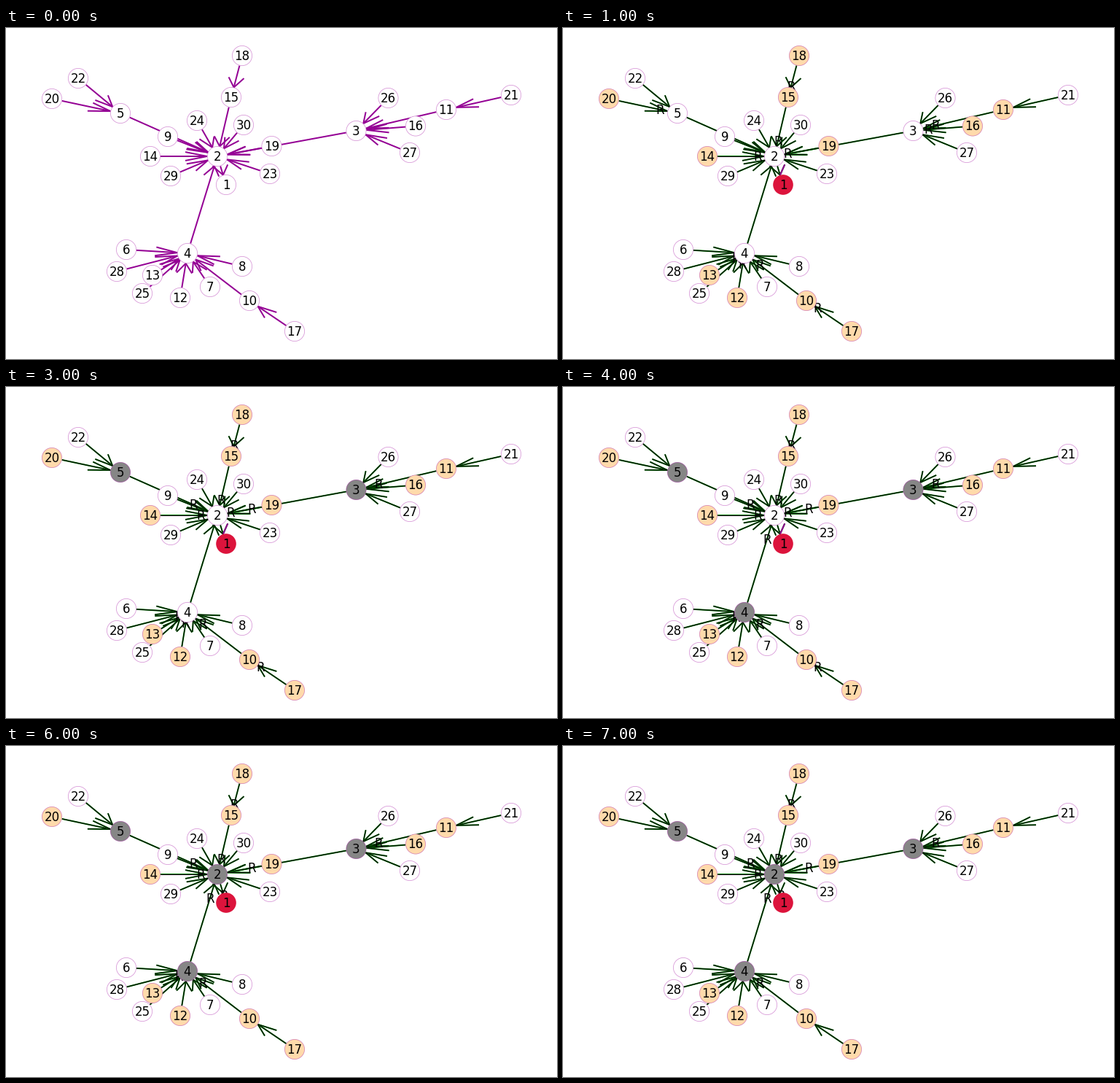
Animation, 756 px wide and 454 px high, one loop 8 s. Source, as a matplotlib script:

```python
import math
import matplotlib.pyplot as plt
from matplotlib.animation import FuncAnimation
from matplotlib.patches import Circle

W, H, DPI = 756, 454, 100
PX = 72 / DPI
RADIUS = 14
STRETCH = 1.79      # arrowheads are wider than tall by this ratio
PURPLE, GREEN, BLACK = "#940094", "#008000", "#000000"
WHITE, PEACH, GRAY, RED = "#ffffff", "#ffdaab", "#868686", "#dc143c"

POS = dict(enumerate([
    (302, 215), (290, 176), (480.5, 141), (249, 309), (157, 117),
    (165, 304), (280, 355), (324, 327), (222, 149), (334, 374),
    (604, 112), (239, 370), (201, 339), (198, 176), (309, 95),
    (562, 134.5), (396, 416), (324, 38), (364.5, 162), (63, 97),
    (693, 92), (99, 69), (362, 200), (262, 127), (187, 364),
    (524.5, 96), (554, 171), (152, 334), (226, 203), (326, 133)], 1))

CHILDREN = {1: [2], 2: [3, 4, 5, 9, 14, 15, 19, 23, 24, 29, 30],
            3: [11, 16, 26, 27], 4: [6, 7, 8, 10, 12, 13, 25, 28],
            5: [20, 22], 10: [17], 11: [21], 15: [18]}
PARENT = {c: p for p, kids in CHILDREN.items() for c in kids}

SENDERS = range(10, 21)
# one request per step: the sender is served, its parent forwards
SERVED = [16, 20, 12, 17, 19, 13]

fig = plt.figure(figsize=(W / DPI, H / DPI), dpi=DPI, facecolor="white")
ax = fig.add_axes([0, 0, 1, 1])


def arrow_points(src, dst):
    """Shaft and head polylines, trimmed at the node borders."""
    (xs, ys), (xd, yd) = POS[src], POS[dst]
    dx, dy = xs - xd, ys - yd
    dist = math.hypot(dx, dy)
    ux, uy = dx / dist, dy / dist
    tip = (xd + RADIUS * ux, yd + RADIUS * uy)
    tail = (xs - RADIUS * ux, ys - RADIUS * uy)
    # head is square to the shaft only in unstretched space
    squash = math.hypot(ux / STRETCH, uy)
    vx, vy = ux / STRETCH / squash, uy / squash
    back = 21.2 + 0.43 * RADIUS * squash
    wings = [(xd + STRETCH * (back * vx - s * vy), yd + back * vy + s * vx)
             for s in (-5.9, 5.9)]
    return [tail, tip], [wings[0], tip, wings[1]]


def stroke(points, color, width, z=1):
    ax.plot(*zip(*points), color=color, lw=width * PX, zorder=z,
            solid_capstyle="butt", solid_joinstyle="miter")


def label(x, y, text, z):
    ax.text(x, y + 5.7, text, size=12, family="DejaVu Sans", color="black",
            ha="center", va="baseline", zorder=z)


def state(step):
    """Fill colours and the nodes whose upward edge carries a request."""
    fill = dict.fromkeys(POS, WHITE)
    if step == 0:
        return fill, set()
    fill.update(dict.fromkeys(SENDERS, PEACH))
    fill[1] = RED
    active = set(SENDERS)
    for node in SERVED[:step - 1]:
        up = PARENT[node]
        active.remove(node)
        active.add(up)
        if fill[up] == WHITE:
            fill[up] = GRAY
    return fill, active


def draw(step):
    ax.clear()
    ax.set(xlim=(0, W), ylim=(H, 0))
    ax.axis("off")
    fill, active = state(step)

    for src, dst in PARENT.items():
        shaft, head = arrow_points(src, dst)
        for line in (shaft, head):
            if step == 0:
                stroke(line, PURPLE, 2)
            else:
                stroke(line, GREEN, 2)
                stroke(line, BLACK, 1.1)
        # one side of the root's arrowhead stays purple until it is used
        if dst == 1 and 0 < step < 6:
            stroke(max(head[:2], head[1:], key=lambda w: w[0][0] + w[1][0]),
                   PURPLE, 2)

    for src in active:
        (xs, ys), (xd, yd) = POS[src], POS[PARENT[src]]
        label(xd + (xs - xd) / 4, yd + (ys - yd) / 4, "R", 2)

    for node, (x, y) in POS.items():
        ax.add_patch(Circle((x, y), RADIUS - 0.2, fc=fill[node], ec="none",
                            zorder=3))
        if fill[node] != RED:
            ax.add_patch(Circle((x, y), RADIUS - 0.4, fc="none", ec="#b030b0",
                                lw=0.8 * PX, alpha=0.5, zorder=4))
        label(x, y, str(node), 5)
    return []


anim = FuncAnimation(fig, draw, frames=8, interval=1000, repeat=True,
                     repeat_delay=0, init_func=lambda: draw(0))
plt.show()
```
